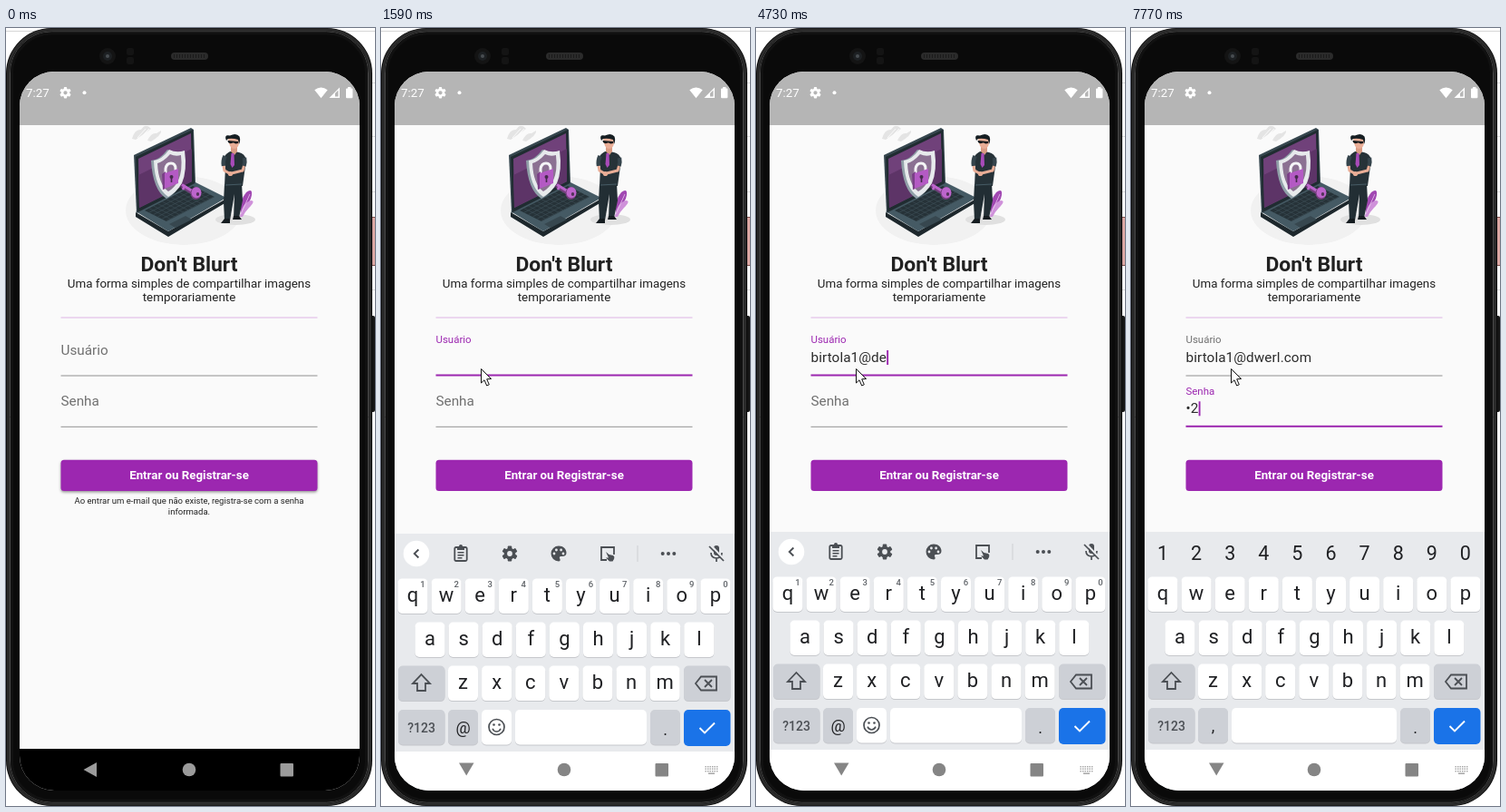
Recreate the animation shown at these times as an HTML page with a canvas. Size 407 px wide and 857 px high, loop 8 s.

```html
<!DOCTYPE html>
<html lang="pt-BR">
<head>
<meta charset="utf-8">
<style>
html, body { margin: 0; width: 100%; height: 100%; overflow: hidden; background: #fff; }
canvas { display: block; width: 407px; height: 857px; }
</style>
</head>
<body>
<canvas id="stage"></canvas>
<script>
const LOOP = 8000, W = 407, H = 857;
const PURPLE = '#9c27b0', GREY = '#707070', INK = '#212121', KEY_INK = '#202124', ICON = '#4b4f54';
const canvas = document.getElementById('stage');
const dpr = window.devicePixelRatio || 1;
canvas.width = W * dpr;
canvas.height = H * dpr;
const c = canvas.getContext('2d');

const USER = 'birtola', HOST = '@dwerl.com';
const clamp = (v) => Math.max(0, Math.min(1, v));
const mix = (a, b, p) => a + (b - a) * p;
const easeOut = (p, k) => 1 - Math.pow(1 - clamp(p), k);
const easeBoth = (p) => { p = clamp(p); return p * p * (3 - 2 * p); };

// ---------- drawing helpers ----------
function rect(x, y, w, h, color) { c.fillStyle = color; c.fillRect(x, y, w, h); }
function round(x, y, w, h, r, color) {
  c.beginPath(); c.roundRect(x, y, w, h, r);
  c.fillStyle = color; c.fill();
}
function outline(x, y, w, h, r, color, width) {
  c.beginPath(); c.roundRect(x, y, w, h, r);
  c.strokeStyle = color; c.lineWidth = width; c.stroke();
}
function disc(x, y, r, color, ry = r) {
  c.beginPath(); c.ellipse(x, y, r, ry, 0, 0, 7);
  c.fillStyle = color; c.fill();
}
function trace(pts) {
  c.beginPath();
  for (let i = 0; i < pts.length; i += 2) c.lineTo(pts[i], pts[i + 1]);
}
function poly(color, ...pts) { trace(pts); c.closePath(); c.fillStyle = color; c.fill(); }
function line(color, width, ...pts) {
  trace(pts); c.strokeStyle = color; c.lineWidth = width; c.stroke();
}
function path(d, color, width) {
  const p = new Path2D(d);
  if (width) { c.strokeStyle = color; c.lineWidth = width; c.stroke(p); }
  else { c.fillStyle = color; c.fill(p); }
}
function text(str, x, y, size, color, align = 'left', weight = 400) {
  c.font = `${weight} ${size}px Roboto, sans-serif`;
  c.textAlign = align;
  c.fillStyle = color;
  c.fillText(str, x, y);
}
function at(x, y, draw) {
  c.save(); c.translate(x, y); draw(); c.restore();
}
function gear(x, y, r, color, hole) {
  at(x, y, () => {
    disc(0, 0, r * .74, color);
    for (let i = 0; i < 6; i++) {
      c.rotate(Math.PI / 3);
      round(-r * .27, -r, r * .54, r * .6, 1, color);
    }
    disc(0, 0, r * .34, hole);
  });
}

// ---------- phone ----------
function drawPhone() {
  rect(0, 0, W, H, '#fff');
  rect(0, 3, W, 1, '#d5d5d5');
  for (const y of [60, 119, 180, 288]) rect(400, y, 7, 1, '#dcdcdc');
  rect(402, 208, 5, 54, '#7b4a47');
  rect(404, 209, 3, 52, '#dba7a2');
  round(401, 317, 6, 106, 2, '#151515');
  round(0, 0, 404, 857, 50, '#0a0a0a');
  outline(2.5, 2, 399, 853, 48, '#2a2a2a', 3);
  outline(4.5, 4, 395, 849, 46, '#4a4a4a', 1);
  outline(6.5, 6, 391, 845, 44, '#111', 3);
  disc(112, 31, 9, '#141414');
  disc(112, 31, 5, '#1d2023');
  disc(112, 31, 2, '#484d52');
  round(133, 22, 8, 8, 2, '#141414');
  round(133, 32, 8, 8, 2, '#141414');
  round(182, 27, 41, 8, 4, '#2b2b2b');
  for (let x = 185; x < 221; x += 3) rect(x, 29, 1, 4, '#1b1b1b');
}

function drawStatus() {
  rect(15, 48, 375, 59, '#b5b5b5');
  text('7:27', 22, 76, 13.4, '#fff');
  gear(65.5, 71.3, 6.3, '#fff', '#b5b5b5');
  disc(86.5, 71.3, 2, '#fff');
  path('M340.3 68.3Q347.5 62.8 354.7 68.3L347.5 77.2Z', '#fff');
  path('M356.5 77L368 65.5V77Z', '#fff');
  path('M363 72L366.5 68.6V75.6H363Z', '#b5b5b5');
  round(375, 66.5, 7.4, 10.8, 1, '#fff');
  rect(377, 65, 3.4, 2, '#fff');
}

// ---------- illustration ----------
function drawLaptop() {
  poly('#1d272c', 143, 203, 179, 224, 243, 188, 243, 192, 179, 230, 143, 208);
  poly('#455a64', 143, 202, 207, 169, 243, 187, 179, 224);
  poly('#263238', 153, 201, 206, 174, 230, 186, 177, 213);
  for (let i = 1; i < 6; i++) {
    const x = i * 4.8, y = i * 2.3;
    line('#40525b', .6, 153 + x, 201 + y, 206 + x, 174 + y);
  }
  for (let i = 1; i < 11; i++) {
    const x = i * 4.8, y = i * -2.45;
    line('#40525b', .5, 153 + x, 201 + y, 177 + x, 213 + y);
  }
  poly('#37474f', 180, 216, 198, 207, 205, 211, 187, 220);
  poly('#37474f', 141, 140, 204, 110, 207, 112, 209, 171, 144, 204);
  poly('#202c31', 143, 142, 206, 112, 208, 171, 145, 203);
  poly('#70417a', 146, 144, 204, 116, 205, 169, 147, 198);
  poly('#5d3467', 146, 162, 205, 133, 205, 169, 147, 198);
}

function drawShield() {
  path('M160 146Q169 146 178 134Q187 139 195 136Q198 157 193 171Q187 183 177 188Q162 179 160 146Z', '#90a0a8');
  path('M163 146Q172 145 180 134Q188 138 197 135Q200 157 194 171Q188 181 179 186Q164 176 163 146Z', '#e7eaec');
  path('M167 149Q174 147 181 139Q187 142 193 140Q195 157 190 168Q186 176 179 180Q168 172 167 149Z', '#8b7192');
  path('M176 160V155Q177 149 182 149Q187 149 187 155V158', '#f4f5f6', 3);
  poly('#7b3f88', 172, 161, 176, 158, 176, 177, 173, 178);
  poly('#b45ac4', 175, 160, 190, 155, 190, 171, 175, 177);
  disc(182.5, 164, 2, '#452a4b');
  line('#452a4b', 1.6, 182.5, 164, 182.5, 170);

  // key
  line('#76417f', 4.5, 194, 174, 207, 182);
  line('#bd65cc', 3, 194, 172.5, 207, 180.5);
  line('#bd65cc', 2.5, 197, 174, 195, 178);
  disc(209.5, 182, 6, '#76417f', 7);
  disc(210, 181.3, 5.4, '#bd65cc', 6);
  disc(211.5, 183, 1.7, '#55345c', 2);
}

function drawGuard() {
  const skin = '#e9ad96';
  path('M241 172L260 171L261 190L257 209H251L252 183L247 212H241L240 191Z', '#222e34');
  path('M241 210H247V215H237ZM251 207H257L260 211H250Z', '#151c20');
  path('M240 143Q243 137 249 135.5L257 137Q263 138 265 145L261 174L241 174L242 153Z', '#263238');
  path('M248 129H255V136L252 140L248 136Z', '#d99b83');
  path('M245 122Q245 118 252 118Q258 119 257 127Q256 133 251 133Q246 132 245 122Z', skin);
  path('M243 124Q240 117 247 118.5Q254 115 257.5 119.5Q259 124 257 128L256 123Q250 121 245 122Z', '#161e22');
  path('M244.5 124L256 125V127Q253 128 251.5 126.5L250 126.5Q247 128 245 126Z', '#11181b');
  poly('#a84bb9', 248.5, 138, 251.5, 138, 252, 151, 249.5, 154, 247.5, 150);
  path('M241.5 141Q239 146 240 152M263 143Q264 148 262.5 152', '#35444c', 4.5);
  path('M240 152L241 157L248 161M262.5 152L261 157L249 160', skin, 3);
  disc(247.5, 160.5, 2.6, skin);
  line('#455a64', 1, 242, 173, 260, 172);
}

function drawArt() {
  disc(196, 201, 64, '#f1f1f1', 38);
  path('M139 122Q142 111 149 112Q154 104 160 111L143 123ZM156 124Q160 115 166 116L171 113Q172 118 160 125Z', '#e4e4e4');
  line('#fafafa', 1, 145, 121, 154, 111);
  line('#fafafa', 1, 149, 120, 158, 111);
  disc(253, 211, 22, '#e0e0e0', 6);
  drawLaptop();
  drawShield();
  path('M259 206Q257 190 265 181Q272 176 271 184Q270 192 261 199Z', '#a148b2');
  path('M258 208Q260 193 270 190Q276 190 268 198Q264 202 261 208Z', '#cf91da');
  line('#f0d5f4', .7, 259, 205, 269, 183);
  drawGuard();
}

// ---------- form ----------
function field(label, base, value, lift, focused, caret, composing) {
  const color = focused ? PURPLE : GREY;
  const size = mix(15.28, 11.46, lift);
  text(label, 60.5, mix(base - 23.5, base - 35.7, lift), size, color);
  c.letterSpacing = '0.1px';
  text(value, 60.5, base - 15, 15.28, '#2b2b2b');
  const end = 60.5 + c.measureText(value).width;
  c.letterSpacing = '0px';
  if (composing && value) rect(60.5, base - 13.5, end - 60.5, 1, '#333');
  if (caret) rect(end + .2, base - 28, composing ? 1.4 : 1.9, 16, composing ? '#805c89' : PURPLE);
  if (focused) rect(60.5, base - 1.5, 283, 2, PURPLE);
  else rect(60.5, base - .5, 283, 1, '#929292');
}

function drawForm(s) {
  c.save();
  c.beginPath(); c.rect(15, 107, 375, s.clip - 107); c.clip();
  drawArt();
  text("Don't Blurt", 202, 267.5, 22.9, INK, 'center', 700);
  text('Uma forma simples de compartilhar imagens', 202, 286, 13.37, INK, 'center');
  text('temporariamente', 202, 301, 13.37, INK, 'center');
  rect(60.5, 318.5, 283, 1, '#dfb5e6');
  field('Usuário', 383, s.user, s.userLift, s.focus === 1, s.focus === 1 && s.caret, s.composing);
  field('Senha', 439.3, s.pass, s.passLift, s.focus === 2, s.focus === 2 && s.caret);
  c.save();
  if (!s.open) {
    c.shadowColor = 'rgba(0,0,0,.4)';
    c.shadowBlur = 3 * dpr;
    c.shadowOffsetY = 1.6 * dpr;
  }
  round(60.5, 475.7, 283, 34.3, 3.5, PURPLE);
  c.restore();
  text('Entrar ou Registrar-se', 202, 497, 13.3, '#fff', 'center', 600);
  text('Ao entrar um e-mail que não existe, registra-se com a senha', 202, 524, 9.55, INK, 'center');
  text('informada.', 202, 535.5, 9.55, INK, 'center');
  c.restore();
}

// ---------- keyboard ----------
function key(x, y, w, color = '#fff') {
  round(x, y + 1, w, 38.5, 5, '#c6c8cc');
  round(x, y, w, 38.5, 5, color);
}
function letters(row, x, y, hints) {
  [...row].forEach((ch, i) => {
    const cx = x + i * 37.1;
    key(cx - 16.5, y, 33);
    text(ch, cx, y + 25.4, 22, KEY_INK, 'center');
    if (hints) text((i + 1) % 10, cx + 11, y + 10, 9.5, '#5f6368', 'center', 500);
  });
}
function drawMic() {
  at(370, 22, () => {
    round(-3, -9, 6, 11, 3, ICON);
    path('M-6 -1Q-6 5 0 5Q6 5 6 -1M0 5V9', ICON, 1.7);
    line('#e8eaed', 2.4, -6, -9, 9, 7);
    line(ICON, 1.7, -8, -8, 8, 8);
  });
}
function drawTools() {
  at(88, 22, () => {
    outline(-6.7, -7, 13.4, 15, 1.5, ICON, 1.8);
    rect(-4, -8, 8, 4, ICON);
    disc(0, -8, 2, ICON);
    for (const [y, w] of [[-2, 7], [1, 7], [4, 5]]) rect(-3.5, y, w, 1.5, ICON);
  });
  gear(142, 22, 8.5, ICON, '#e8eaed');
  at(196, 22, () => {
    path('M0 -8.5C5 -8.5 8.5 -5 8.5 -1Q8.5 3 4 3H2Q0 3.5 1.5 6Q2 8.5 0 8.5A8.5 8.5 0 0 1 0 -8.5Z', ICON);
    for (const [x, y] of [[-5, 0], [-2.6, -4], [2.6, -4], [5, 0]]) disc(x, y, 1.4, '#e8eaed');
  });
  at(250, 22, () => {
    path('M7 1V-7H-7V7H-1', ICON, 1.8);
    path('M-2 -2L1.5 1L6 2Q8 3 7 6L5.5 8.5H2L-2 4.5L1 4.5Z', ICON);
  });
  rect(282.5, 13, 1, 18, '#cdd0d4');
  for (const x of [-6.3, 0, 6.3]) disc(317 + x, 22, 2, ICON);
}
function drawSuggestions(s) {
  c.globalAlpha = s.suggest;
  text(s.user, 98, 28.5, 17.5, ICON, 'center');
  for (const x of [147, 256]) rect(x - .5, 11, 1, 22, '#c5c8cc');
  for (let i = 1; i <= s.emails; i++) {
    const x = i === 1 ? 201 : 304;
    text(USER + i, x, 15, 13.5, ICON, 'center', 500);
    text(HOST, x, 31, 11.5, ICON, 'center');
  }
  c.globalAlpha = 1;
}
function drawKeyboard(s) {
  const dark = '#cdd0d6';
  const row3 = 145.6, row4 = 194;
  c.save();
  c.translate(0, s.top);
  rect(15, 0, 375, 300, '#e8eaed');
  if (s.digits) {
    for (let i = 0; i < 10; i++) text((i + 1) % 10, 35 + i * 37.1, 30.5, 21.5, KEY_INK, 'center');
  } else {
    disc(39, 22, 14.3, '#fff');
    const d = s.suggest ? 1 : -1;
    line(ICON, 1.9, 39 - d * 2.4, 17.5, 39 + d * 2.2, 22, 39 - d * 2.4, 26.5);
    if (s.suggest) drawSuggestions(s); else drawTools();
    drawMic();
  }
  letters('qwertyuiop', 35, 49.4, !s.digits);
  letters('asdfghjkl', 54, 97.5);
  letters('zxcvbnm', 90.5, row3);
  key(19, row3, 51.5, dark);
  path('M44.5 155L54 165H49V173H40V165H35Z', ICON, 1.8);
  key(334, row3, 51.5, dark);
  path('M347 165L353 157.5H370V172.5H353ZM357 161L365 169M365 161L357 169', ICON, 1.8);

  key(19, row4, 51.5, dark);
  text('?123', 44.5, 219, 14, ICON, 'center', 500);
  key(74, row4, 33, dark);
  text(s.digits ? ',' : '@', 90.5, 220, 18, KEY_INK, 'center');
  if (!s.digits) {
    key(111, row4, 33);
    c.beginPath(); c.arc(127.5, 213, 8.5, 0, 7);
    c.strokeStyle = ICON; c.lineWidth = 1.7; c.stroke();
    disc(124.5, 210.5, 1.3, ICON);
    disc(130.5, 210.5, 1.3, ICON);
    path('M123 214.7Q124.5 218 127.5 218Q130.5 218 132 214.7', ICON, 1.6);
  }
  const space = s.digits ? 111 : 148;
  key(space, row4, 293 - space);
  key(297, row4, 33, dark);
  text('.', 313.5, 222, 18, KEY_INK, 'center');
  round(334, row4, 51.5, 40, 5, s.enter ? '#1765cc' : '#1a73e8');
  line('#fff', 1.9, 351.5, 214, 357, 219.5, 368, 208.5);
  c.restore();
}

function drawNav(s) {
  if (s.open) rect(15, s.top + 240, 375, 50, '#fff');
  const color = s.top < 840 ? '#858585' : '#9b9b9b';
  if (s.open) poly(color, 86, 809.5, 102.5, 809.5, 94.2, 823.5);
  else poly(color, 100, 809, 100, 825, 85.5, 817);
  disc(202, 817, 7.3, color);
  round(302.5, 810, 14.5, 14.5, 1, color);
  if (s.open) {
    for (let y = 813; y < 819; y += 2.5)
      for (let x = 357.5; x < 371; x += 2.5) rect(x, y, 1.4, 1.4, '#a0a0a0');
    rect(361, 820.5, 7, 1.4, '#a0a0a0');
  }
}

function drawMouse(x, y) {
  at(x, y, () => {
    trace([.5, .5, .5, 16, 4, 12.8, 6.7, 19, 9.3, 17.8, 6.7, 11.8, 11.5, 11.5]);
    c.closePath();
    c.fillStyle = '#fff'; c.fill();
    c.strokeStyle = '#111'; c.lineWidth = 1; c.stroke();
  });
}

// ---------- timeline ----------
const first = USER + '1';
const userKeys = [
  ...[2120, 2460, 2660, 2730, 2860, 2930, 3000].map((t, i) => [t, USER.slice(0, i + 1)]),
  [3530, first], [4070, first + '@'], [4330, first + '@d'], [4730, first + '@de'],
  [4860, first + '@dew'], [5060, first + '@dewr'], [5390, first + '@dew'],
  [5520, first + '@de'], [5650, first + '@d'],
  ...[5980, 6110, 6180, 6440, 6640, 6770, 6840, 7040].map((t, i) => [t, first + HOST.slice(0, i + 3)])
];
const passKeys = [[7640, '1'], [7770, '•2']];
const typed = (keys, t) => keys.reduce((v, [k, str]) => t >= k ? str : v, '');

function stateAt(t) {
  const start = t < 1310 ? 130 : 1310;
  const q = start + Math.floor((t - start) / 70) * 70;
  const top = 840 - 285 * easeOut((q - 1346) / 283, 2.5);
  return {
    q, top,
    open: t >= 1590,
    clip: top < 840 ? top - 45 : 794,
    user: typed(userKeys, t),
    pass: typed(passKeys, t),
    userLift: easeBoth((q - 900) / 200),
    passLift: t < 7240 ? 0 : easeBoth((Math.floor((t - 7240) / 67) + 1) / 4),
    focus: t < 970 ? 0 : t < 7240 ? 1 : 2,
    caret: t >= 1110 && (t < 1590 || t >= 2120),
    composing: t >= 2120 && t < 3530,
    suggest: t < 2190 || t >= 4070 ? 0 : t < 2260 ? .5 : 1,
    emails: t < 3600 ? 2 : 1,
    digits: t >= 7310,
    enter: t >= 7240 && t < 7440
  };
}

function draw(t) {
  const s = stateAt(t);
  c.setTransform(dpr, 0, 0, dpr, 0, 0);
  drawPhone();
  c.save();
  c.beginPath(); c.roundRect(15, 48, 375, 792, 38); c.clip();
  rect(15, 48, 375, 792, '#fafafa');
  drawStatus();
  drawForm(s);
  rect(15, 794, 375, 46, '#000');
  if (s.top < 840) drawKeyboard(s);
  drawNav(s);
  c.restore();
  if (t >= 130) {
    const p = easeBoth((s.q - 60) / 840);
    drawMouse(mix(347, 110, p), mix(850, 375, p));
  }
}

function tick(now) {
  draw(now % LOOP);
  requestAnimationFrame(tick);
}
requestAnimationFrame(tick);
</script>
</body>
</html>
```
